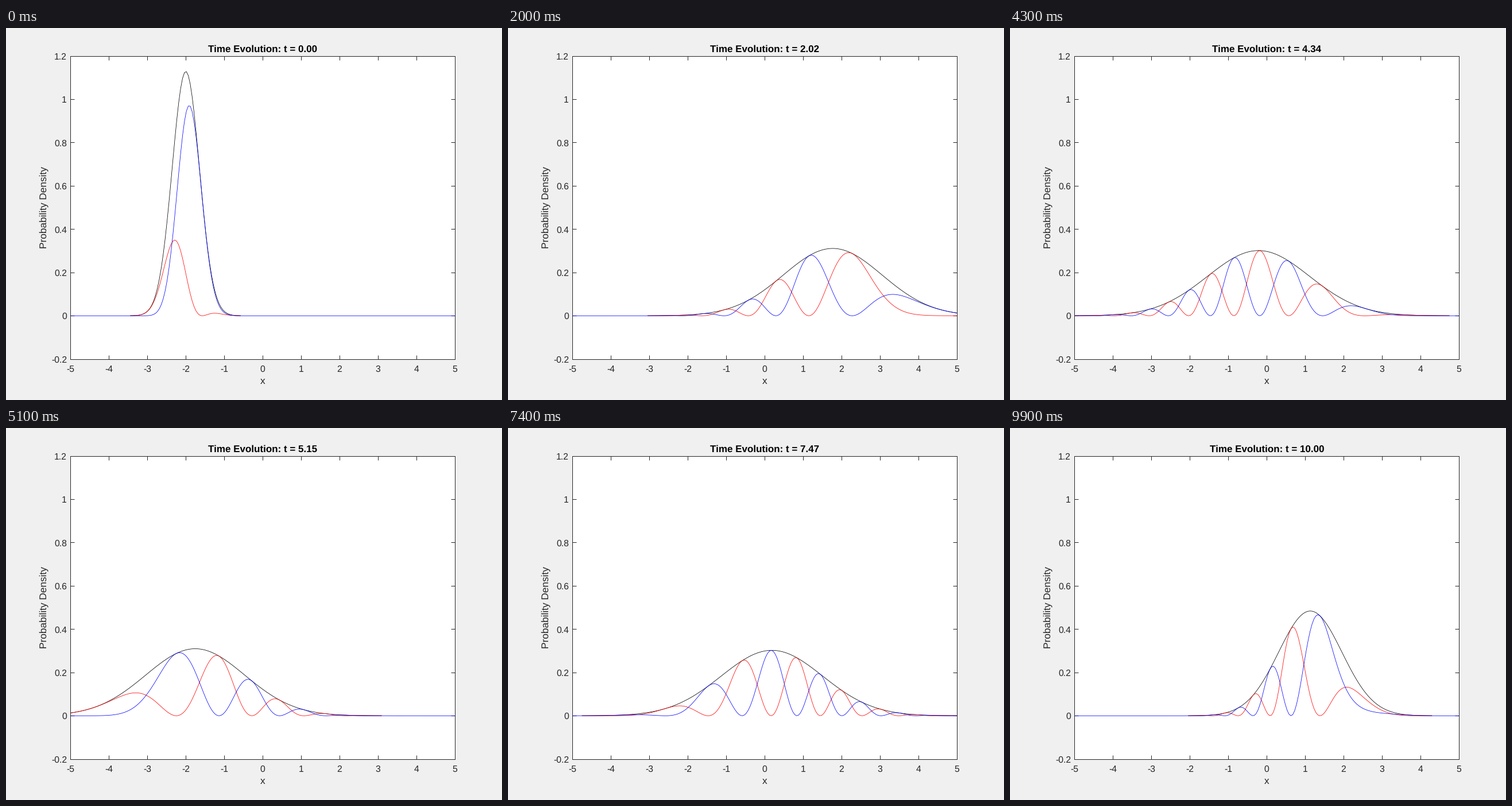
Write a matplotlib script that moves like this. It is 864 px wide and 648 px high and loops after 10000 ms.

```python
import numpy as np
import matplotlib.pyplot as plt
from matplotlib.animation import FuncAnimation

W, H = 864, 648
FRAMES, INTERVAL = 100, 100
LEFT, RIGHT, TOP, BOTTOM = 0.13 * W, 0.905 * W, 0.075 * H, 0.89 * H
INK = "#262626"
THIN = 0.77

# Gaussian packet in a harmonic trap (hbar = m = omega = 1)
Q0, P0, W0 = -2.0, 1.0, 0.5
VISIBLE = 2.5e-4

plt.rcParams.update({"font.family": "Liberation Sans", "path.simplify": False,
                     "text.hinting": "none"})

x = np.linspace(-5, 5, 200)
times = np.linspace(0, 10, FRAMES)


def wave(t):
    """Exact squeezed-state wave function at time t."""
    c, s = np.cos(t), np.sin(t)
    q, p = Q0 * c + P0 * s, P0 * c - Q0 * s
    z, dz = W0 * c + 1j * s / W0, -W0 * s + 1j * c / W0
    action = (p * q + P0 * Q0) / 2
    d = x - q
    phase = 0.5 * dz / z * d**2 + p * d + action
    return np.pi**-0.25 / np.sqrt(z) * np.exp(1j * phase)


fig = plt.figure(figsize=(W / 72, H / 72), dpi=72, facecolor="#f0f0f0")
ax = fig.add_axes([LEFT / W, 1 - BOTTOM / H, (RIGHT - LEFT) / W, (BOTTOM - TOP) / H])
ax.set(xlim=(-5, 5), ylim=(-0.2, 1.2))
xticks = np.arange(-5, 6)
yticks = np.arange(-1, 7) / 5
ax.set_xticks(xticks)
ax.set_yticks(yticks)
ax.tick_params(direction="in", top=True, right=True, length=6.7, width=1,
               color=INK, labelbottom=False, labelleft=False)
for spine in ax.spines.values():
    spine.set(color=INK, linewidth=1)


def label(px, py, text, size, ha="center", **kw):
    """Text with its baseline at a pixel position measured from the top left."""
    kw.setdefault("color", INK)
    return fig.text(px / W, 1 - py / H, text, fontsize=size, ha=ha,
                    va="baseline", rotation_mode="anchor", **kw)


for v in xticks:
    label(LEFT + (v + 5) / 10 * (RIGHT - LEFT), 599, f"{v:g}", 15.8)
for v in yticks:
    label(106, BOTTOM - (v + 0.2) / 1.4 * (BOTTOM - TOP) + 6, f"{v:g}", 15.8, "right")
label(447.1, 620, "x", 17.2)
label(70.5, 312.5, "Probability Density", 17.2, rotation=90)
title = label(447.3, 42.3, "", 17, color="black", weight="bold")

total, real, imag = (ax.plot([], [], color=c, lw=THIN)[0] for c in ("black", "red", "blue"))


def draw(i):
    psi = wave(times[i])
    density = np.abs(psi)**2
    shown = density > VISIBLE
    total.set_data(x, np.where(shown, density, np.nan))
    real.set_data(x, np.where(shown, psi.real**2, np.nan))
    imag.set_data(x, psi.imag**2)
    title.set_text(f"Time Evolution: t = {times[i]:.2f}")
    return total, real, imag, title


anim = FuncAnimation(fig, draw, frames=FRAMES, interval=INTERVAL, repeat=True)
plt.show()
```
